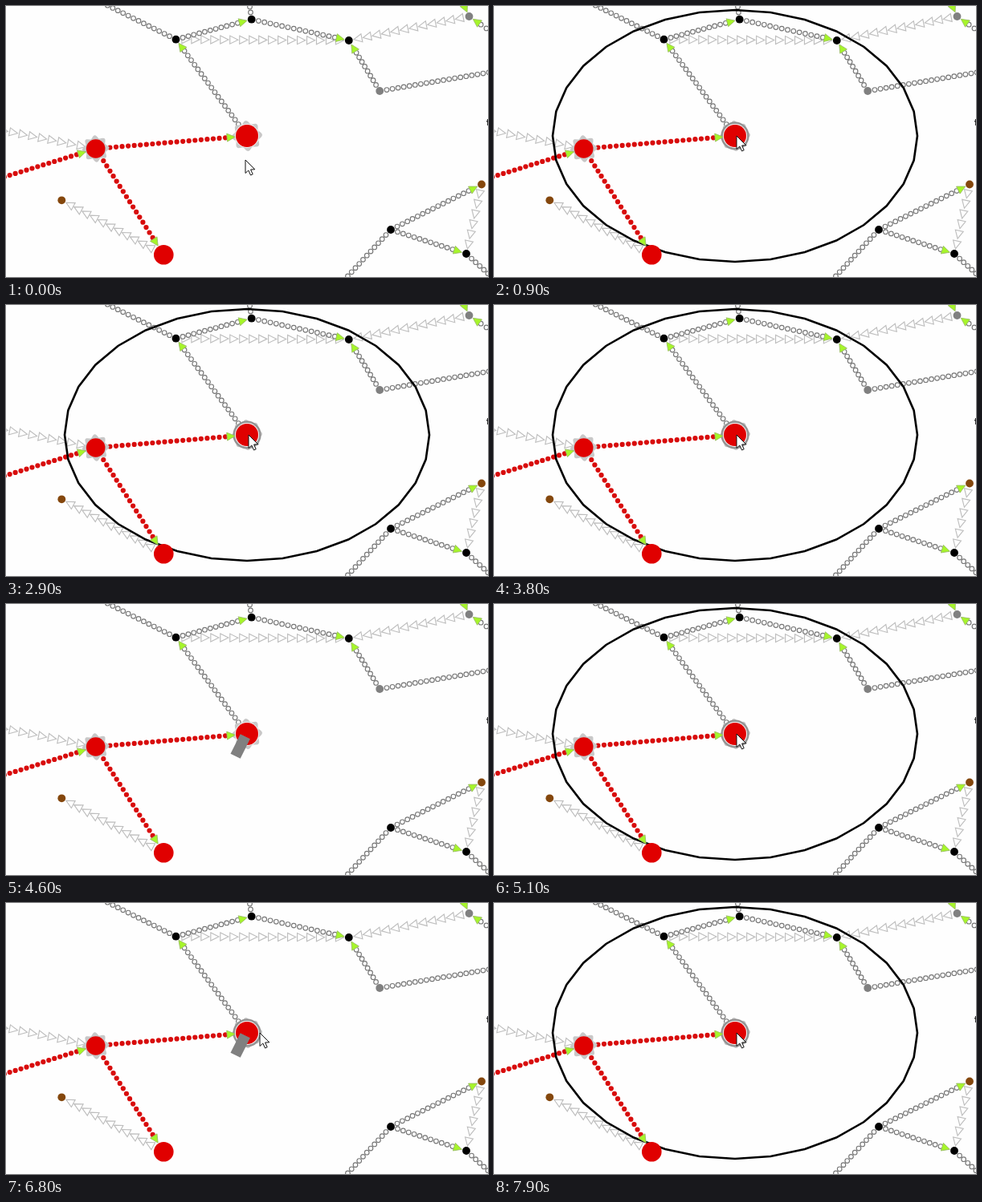
Animation of 600x338 px, one loop 8 s. Source, as an HTML page with a canvas:

```html
<!DOCTYPE html>
<html lang="en">
<head>
<meta charset="utf-8">
<title>Network</title>
<style>
html, body { margin: 0; width: 100%; height: 100%; overflow: hidden; background: #fefefe; }
canvas { display: block; width: 600px; height: 338px; }
</style>
</head>
<body>
<canvas id="stage" width="600" height="338"></canvas>
<script>
const LOOP = 8000, TAU = Math.PI * 2;
const RED = '#e00000', GREY = '#808080', BROWN = '#84470c', BLACK = '#000';
const ctx = document.getElementById('stage').getContext('2d');

// Nodes without a colour lie off stage.
const node = (x, y, color, r = color ? 4.9 : 0) => ({ x, y, r, color });
const hub = node(300, 162, RED, 14);
const west = node(111.7, 178, RED, 11.8);
const south = node(196.3, 310.2, RED, 12.3);
const a = node(211.5, 41.7, BLACK), b = node(305.7, 16.7, BLACK), c = node(426.8, 43, BLACK);
const d = node(465.2, 106, GREY), e = node(576.5, 13, GREY);
const f = node(479, 279, BLACK), g = node(573, 309, BLACK);
const h = node(69.3, 242.3, BROWN), k = node(592, 222.5, BROWN);
const nodes = [hub, west, south, a, b, c, d, e, f, g, h, k];

const beadLines = [
  [node(110, -9), a], [b, node(302, -10)], [d, node(612, 81)],
  [f, node(418, 345)], [g, node(608, 341)]
];
const beadArrows = [
  [a, b], [b, c], [d, c], [hub, a], [f, k], [f, g], [node(608, 35), e], [node(566, -10), e]
];
const redArrows = [[node(-8, 215), west], [west, hub], [west, south]];
const markLines = [[a, c], [e, c], [node(-10, 154), west], [south, h], [k, g]];

// The range outline starts off and flips at each time.
const flips = [500, 1400, 2300, 4100, 5000, 6100, 7500];

function paint(fill, stroke, width) {
  if (fill) { ctx.fillStyle = fill; ctx.fill(); }
  if (stroke) { ctx.strokeStyle = stroke; ctx.lineWidth = width; ctx.stroke(); }
}

function disc(x, y, r, fill, stroke, width = 1) {
  ctx.beginPath();
  ctx.arc(x, y, r, 0, TAU);
  paint(fill, stroke, width);
}

function poly(points, fill, stroke, width = 1) {
  ctx.beginPath();
  points.forEach(([x, y]) => ctx.lineTo(x, y));
  ctx.closePath();
  paint(fill, stroke, width);
}

function ring(count, x, y, radius) {
  return Array.from({ length: count }, (_, i) => {
    const angle = i / count * TAU, [rx, ry] = radius(angle);
    return [x + rx * Math.cos(angle), y + ry * Math.sin(angle)];
  });
}

function triangle(x, y, angle, size, fill, stroke, width) {
  ctx.save();
  ctx.translate(x, y);
  ctx.rotate(angle);
  poly([[size, 0], [-size * 0.8, -size * 0.9], [-size * 0.8, size * 0.9]], fill, stroke, width);
  ctx.restore();
}

// Spreads shapes evenly between two nodes, clear of both rims.
function spread([p, q], gap, from, to, shape) {
  const dx = q.x - p.x, dy = q.y - p.y, len = Math.hypot(dx, dy);
  const start = p.r + from, span = len - start - q.r - to;
  const count = Math.round(span / gap);
  for (let i = 0; i <= count; i++) {
    const s = (start + span * i / count) / len;
    shape(p.x + dx * s, p.y + dy * s, Math.atan2(dy, dx));
  }
}

const bead = (x, y) => disc(x, y, 2.8, '#fff', '#777', 1.15);
const redBead = (x, y) => disc(x, y, 3.1, '#d80c0c');
const mark = (x, y, angle) => triangle(x, y, angle, 5.6, '#fff', '#bebebe', 1.15);

function arrow([p, q]) {
  const angle = Math.atan2(q.y - p.y, q.x - p.x), gap = q.r + 6.5;
  triangle(q.x - gap * Math.cos(angle), q.y - gap * Math.sin(angle), angle, 5.6, '#a6f52a', '#9abb66', 0.8);
}

function gear({ x, y, r }) {
  const wave = angle => {
    const reach = r + 3.2 + 1.9 * Math.cos(8 * angle + 0.6);
    return [reach, reach];
  };
  poly(ring(64, x, y, wave), '#c8c8c8');
}

function range() {
  poly(ring(32, hub.x, hub.y, () => [227, 157]), null, BLACK, 2.6);
}

function bar() {
  ctx.save();
  ctx.translate(291.7, 177.5);
  ctx.rotate(0.46);
  ctx.fillStyle = GREY;
  ctx.fillRect(-6.8, -13.7, 13.6, 27.4);
  ctx.restore();
}

function ease(t, from, to) {
  const p = Math.min(1, Math.max(0, (t - from) / (to - from)));
  return p * p * (3 - 2 * p);
}

function cursorAt(t) {
  const arrive = ease(t, 100, 400);
  const aside = ease(t, 6500, 6750) - ease(t, 7100, 7300);
  return {
    x: 298 + 4 * arrive + 14 * aside,
    y: 192 - 30 * arrive,
    shown: t < 4350 || t >= 4750
  };
}

function pointer(x, y) {
  const shape = [[0, 0], [0, 16.5], [3.8, 13], [6.5, 19], [9.2, 17.8], [6.6, 12], [11.8, 11.8]];
  poly(shape.map(([px, py]) => [x + px, y + py]), '#fff', '#111');
}

function draw(t) {
  const open = flips.filter(at => t >= at).length % 2 === 1;
  const cursor = cursorAt(t);
  const hover = cursor.shown && Math.hypot(cursor.x - hub.x, cursor.y - hub.y) < 18;

  ctx.fillStyle = '#fefefe';
  ctx.fillRect(0, 0, 600, 338);

  markLines.forEach(line => spread(line, 11.8, 7, 7, mark));
  beadLines.forEach(line => spread(line, 7.2, 4, 4, bead));
  beadArrows.forEach(line => spread(line, 7.2, 4, 13, bead));
  redArrows.forEach(line => spread(line, 7.4, 6, 13, redBead));
  if (open) range();

  gear(west);
  gear(hub);
  if (hover) disc(hub.x, hub.y, hub.r + 2.3, null, '#949494', 2.6);
  disc(hub.x, hub.y, hub.r + 1, '#f4f4f4');
  [...beadArrows, ...redArrows].forEach(arrow);
  nodes.forEach(n => disc(n.x, n.y, n.r, n.color));

  // A sliver of a label at the right edge.
  ctx.fillStyle = '#333';
  ctx.fillRect(599, 141, 1, 8);
  ctx.fillRect(598, 143, 2, 1.5);

  if (!open && t >= flips[0]) bar();
  if (cursor.shown) pointer(cursor.x, cursor.y);
}

function tick() {
  draw(performance.now() % LOOP);
  requestAnimationFrame(tick);
}
tick();
</script>
</body>
</html>
```
